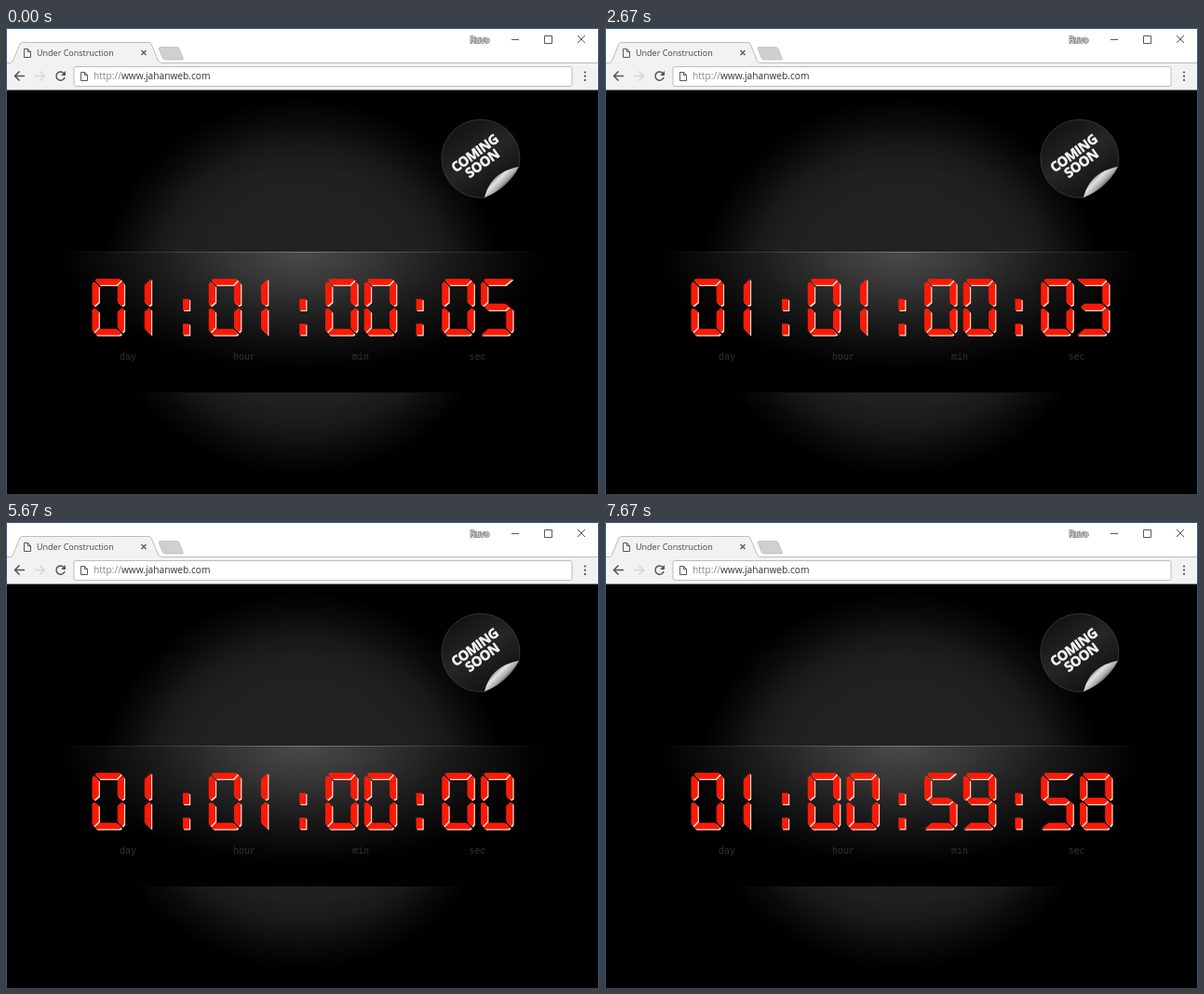
An HTML page for the animation above (8000 ms loop, 637 by 500 pixels).

```html
<!DOCTYPE html>
<html lang="en">
<head>
<meta charset="utf-8">
<title>Under Construction</title>
<style>
  html, body { margin: 0; width: 100%; height: 100%; overflow: hidden; background: #000; }
  svg { display: block; width: 637px; height: 500px; }
  text { font-family: "Open Sans", "Noto Sans", sans-serif; }
  .line { fill: none; stroke: #555; stroke-width: 1.5; }
  .thin { fill: none; stroke: #5a5a5a; stroke-width: 1; }
  .label text { font: 10px "Liberation Mono", monospace; fill: #333; text-anchor: middle; }
  .badge text {
    font-weight: 700; font-size: 14.5px; letter-spacing: -.5px; text-anchor: middle;
    fill: #f6f6f6; stroke: #f6f6f6; stroke-width: .5;
  }
</style>
</head>
<body>
<svg viewBox="0 0 637 500">
  <defs>
    <radialGradient id="glow" gradientUnits="userSpaceOnUse" cx="0" cy="0" r="1"
      gradientTransform="translate(318 278) scale(218 203)">
      <stop offset="0" stop-color="#232323"/>
      <stop offset=".62" stop-color="#202020"/>
      <stop offset=".75" stop-color="#181818"/>
      <stop offset=".88" stop-color="#0a0a0a"/>
      <stop offset="1" stop-color="#000"/>
    </radialGradient>
    <radialGradient id="panel" gradientUnits="userSpaceOnUse" cx="0" cy="0" r="1"
      gradientTransform="translate(318 240) scale(256 125)">
      <stop offset="0" stop-color="#4a4a4a"/>
      <stop offset=".3" stop-color="#363636"/>
      <stop offset=".6" stop-color="#1c1c1c"/>
      <stop offset=".85" stop-color="#0a0a0a"/>
      <stop offset="1" stop-color="#010101"/>
    </radialGradient>
    <linearGradient id="rim">
      <stop offset="0" stop-color="#666" stop-opacity="0"/>
      <stop offset=".2" stop-color="#666" stop-opacity=".35"/>
      <stop offset=".5" stop-color="#777"/>
      <stop offset=".8" stop-color="#666" stop-opacity=".35"/>
      <stop offset="1" stop-color="#666" stop-opacity="0"/>
    </linearGradient>
    <linearGradient id="disc" x1=".1" y1="0" x2=".8" y2="1">
      <stop offset="0" stop-color="#0e0e0e"/>
      <stop offset=".5" stop-color="#262626"/>
      <stop offset="1" stop-color="#0c0c0c"/>
    </linearGradient>
    <linearGradient id="curl" gradientUnits="userSpaceOnUse" x1="524" y1="158" x2="536" y2="170">
      <stop offset="0" stop-color="#666"/>
      <stop offset=".4" stop-color="#e4e4e4"/>
      <stop offset=".75" stop-color="#aaa"/>
      <stop offset="1" stop-color="#555"/>
    </linearGradient>
  </defs>

  <!-- page -->
  <rect y="67" width="637" height="433"/>
  <ellipse cx="318" cy="278" rx="218" ry="203" fill="url(#glow)"/>
  <rect x="62" y="240" width="515" height="151" fill="url(#panel)"/>
  <rect x="62" y="240" width="515" height="1" fill="url(#rim)"/>

  <!-- sticker -->
  <path d="M514 182A42 42 0 1 1 551 149Q528 152 514 182Z" fill="url(#disc)" stroke="#3c3c3c" stroke-width=".8"/>
  <path d="M514 182C518 166 528 153 551 149Q539 172 514 182Z" fill="url(#curl)"/>
  <g class="badge">
    <text transform="translate(506.5 138.500) rotate(-36)">COMING</text>
    <text transform="translate(514.500 149.500) rotate(-36)">SOON</text>
  </g>

  <!-- counter -->
  <g transform="translate(92.500 269)">
    <path id="edge" transform="translate(1.2 1.2)" fill="#ffddcc"/>
    <path id="face" fill="#fc1a06"/>
  </g>
  <g class="label">
    <text x="131" y="356">day</text>
    <text x="256" y="356">hour</text>
    <text x="381" y="356">min</text>
    <text x="506.500" y="356">sec</text>
  </g>

  <!-- browser window -->
  <rect width="637" height="38" fill="#fff"/>
  <rect y="37" width="637" height="30" fill="#f2f2f2"/>
  <path d="M0 37.500H5Q7 37 8 34L15 17Q16 15.500 18 15.500H153Q155 15.500 156 17L163 34Q164 37.500 167 37.500H637" fill="#f2f2f2" stroke="#bcbcbc"/>
  <path d="M6 38.200H166" stroke="#f2f2f2" stroke-width="1.500"/>
  <path d="M165 20.500H183Q185 20.500 186 22L190 32Q191 34 189 34H171Q169 34 168 32L164 22Z" fill="#cfcfcf" stroke="#bebebe" stroke-width=".8"/>
  <path d="M0 66.500H637" stroke="#888"/>
  <rect x="73" y="41.500" width="535" height="21" rx="2" fill="#fff" stroke="#bdbdbd"/>

  <g class="thin" stroke-linejoin="round">
    <path id="doc" d="M19.500 22.500H23.500L26.500 25.500V31.500H19.500ZM23.500 22.500V25.500H26.500"/>
    <use href="#doc" x="61" y="25"/>
    <path d="M145.500 24L150.500 29M150.500 24L145.500 29" stroke-width="1.300"/>
    <path d="M543 12.500H551M578.500 8.500H586.500V16.500H578.500ZM614 8L622 16M622 8L614 16"/>
  </g>
  <g class="line">
    <path d="M20 51.500H9.500M14.500 46.500L9.500 51.500L14.500 56.500"/>
    <path d="M31 51.500H41.500M36.500 46.500L41.500 51.500L36.500 56.500" stroke="#d6d6d6"/>
    <path d="M62 48.500A4.600 4.600 0 1 0 63 53"/>
  </g>
  <path d="M64 46V51H59Z" fill="#555"/>
  <g fill="#555">
    <circle cx="622" cy="47.500" r="1.100"/>
    <circle cx="622" cy="51.700" r="1.100"/>
    <circle cx="622" cy="55.900" r="1.100"/>
  </g>
  <text x="33" y="30" font-size="9" fill="#444">Under Construction</text>
  <text x="94" y="55.300" font-size="10.200" fill="#333"><tspan fill="#888">http://</tspan>www.jahanweb.com</text>
  <text x="498.500" y="16" font-size="9" fill="#f2f2f2" stroke="#777" stroke-width="1.600" paint-order="stroke">Ruvo</text>
  <path d="M.5 500V.5H636.500V500" fill="none" stroke="#2b5789"/>
</svg>

<script>
  const W = 34.4, H = 60.5, PITCH = 41.75, LOOP = 8000;
  const START = 25 * 3600 + 5;
  const SEGMENTS = ["abcdef", "bc", "abged", "abgcd", "fgbc", "afgcd", "afgcde", "abc", "abcdefg", "abcdfg"];
  const SHIFT = { 1: -12.7, 3: -3 };

  const poly = (points, x) =>
    "M" + points.map(([px, py]) => (px + x).toFixed(2) + " " + py).join("L") + "Z";
  const flipX = points => points.map(([x, y]) => [W - x, y]);
  const flipY = points => points.map(([x, y]) => [x, H - y]);

  // An end runs out to the corner unless a neighbour shares it.
  const bar = (left, right) => [
    ...(left ? [[3, 1.5], [5, 0]] : [[0, 0]]),
    ...(right ? [[W - 5, 0], [W - 3, 1.5]] : [[W, 0]]),
    [W - 8, 6.7], [8, 6.7]
  ];
  const post = joined => [
    ...(joined ? [[0, 5.5], [2, 3], [7.2, 8.2]] : [[0, 0], [7.2, 7]]),
    [7.2, 25], [2.5, 29], [0, 27.5]
  ];
  const half = [[W / 2, 26.8], [8, 26.8], [4, H / 2], [8, H - 26.8], [W / 2, H - 26.8]];
  const middle = [...half, ...flipX(half).reverse()];

  function digit(n, x) {
    const on = s => SEGMENTS[n].includes(s);
    const shapes = {
      a: bar(on("f"), on("b")),
      b: flipX(post(on("a"))),
      c: flipY(flipX(post(on("d")))),
      d: flipY(bar(on("e"), on("c"))),
      e: flipY(post(on("d"))),
      f: post(on("a")),
      g: middle
    };
    return [...SEGMENTS[n]].map(s => poly(shapes[s], x + (SHIFT[n] || 0))).join("");
  }

  const dot = (x, y) => `M${x + 14} ${y}h7v12h-7z`;
  const glyph = (ch, i) => {
    const x = i * PITCH;
    return ch === ":" ? dot(x, 21.7) + dot(x, 48.2) : digit(+ch, x);
  };

  function clock(sec) {
    const parts = [sec / 86400, sec / 3600 % 24, sec / 60 % 60, sec % 60];
    return parts.map(v => String(Math.floor(v)).padStart(2, "0")).join(":");
  }

  const layers = [document.getElementById("edge"), document.getElementById("face")];
  let shown = "";
  function draw() {
    const text = clock(START - Math.floor(performance.now() % LOOP / 1000));
    if (text !== shown) {
      shown = text;
      const d = [...text].map(glyph).join("");
      layers.forEach(el => el.setAttribute("d", d));
    }
    requestAnimationFrame(draw);
  }
  draw();
</script>
</body>
</html>
```
